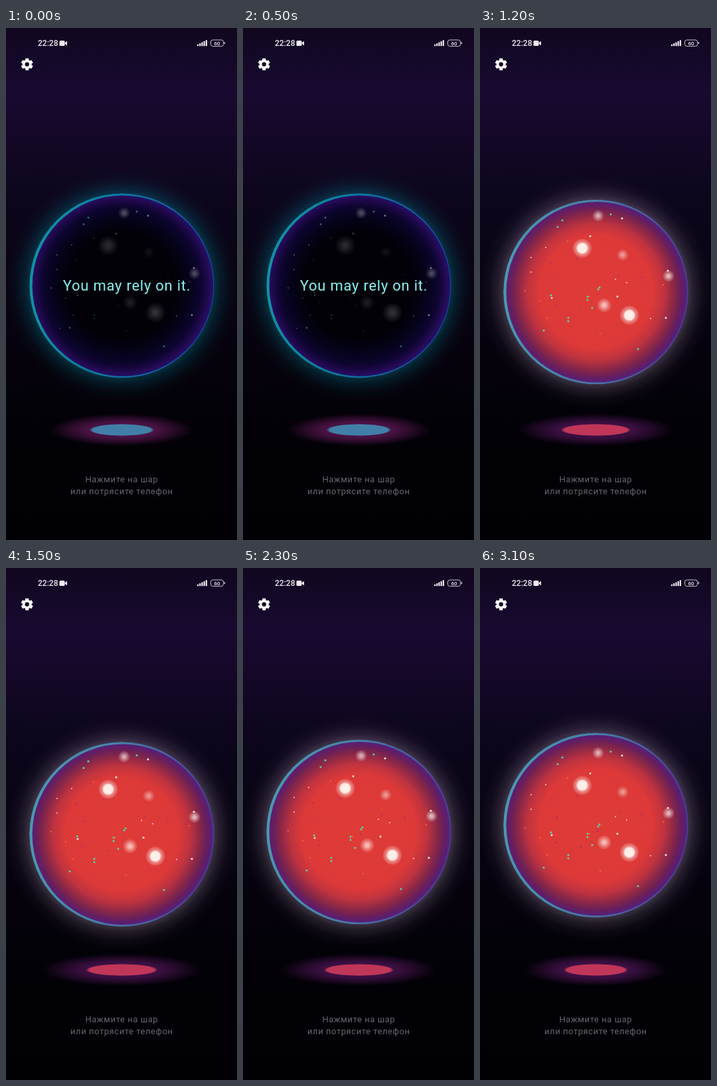
An HTML page with a canvas that plays this animation: 348x772 px, repeating every 3200 ms.

```html
<!DOCTYPE html>
<html lang="ru">
<head>
<meta charset="utf-8">
<style>
html, body { margin: 0; width: 100%; height: 100%; overflow: hidden; background: #030108; }
canvas { display: block; width: 348px; height: 772px; }
</style>
</head>
<body>
<canvas id="stage"></canvas>
<script>
const W = 348, H = 772, LOOP = 3200, STEP = 100;
const CX = 174.5, R = 139, REST_Y = 388.5;
const canvas = document.getElementById('stage');
const dpr = window.devicePixelRatio || 1;
canvas.width = W * dpr;
canvas.height = H * dpr;
const ctx = canvas.getContext('2d');
ctx.scale(dpr, dpr);

const DARK = {
  glow: '0,125,145', glowAlpha: 0.42,
  body: [[0, '#020107'], [0.58, '#020108'], [0.74, '#05031a'], [0.86, '#0d0530'], [0.92, '#1c0846'], [0.965, '#270c5e'], [1, '#141762']],
  rim: [[0, '#1193a3'], [0.35, '#0c7f9c'], [0.7, '#165fa5'], [1, '#243a9c']],
  floor: '#417fa8', floorGlow: '98,24,88'
};
const RED = {
  glow: '150,130,155', glowAlpha: 0.42,
  body: [[0, '#df3b37'], [0.62, '#dc3938'], [0.74, '#bf333f'], [0.86, '#842649'], [0.92, '#6a1f5a'], [0.965, '#5b1d72'], [1, '#47307e']],
  rim: [[0, '#4c98ac'], [0.35, '#4885a6'], [0.7, '#4d62a4'], [1, '#57379b']],
  floor: '#c03658', floorGlow: '78,20,86'
};

// Soft lights: x, y, radius, brightness when red, brightness when dark
const LIGHTS = [
  [154, 328, 15, 1, 0.2], [225, 429, 15, 1, 0.24], [178, 279, 9, 0.65, 0.36],
  [215, 338, 9, 0.5, 0.08], [187, 414, 11, 0.7, 0.14], [284, 370, 9, 0.7, 0.36]
];
// Small dots by colour: x, y pairs
const DOTS = [
  ['#4fe0b0', 1.5, [124,286, 117,296, 197,277, 107,399, 162,401, 162,406, 169,418, 133,433, 133,438, 96,452, 238,480, 180,387, 178,390]],
  ['#fff0ee', 1.5, [214,283, 166,310, 283,362, 280,433, 207,401, 108,403]],
  ['#ffd9cf', 1, [257,434, 99,327, 77,342, 77,364, 204,375, 221,380]],
  ['#f2662c', 1.2, [132,317, 68,392, 90,407, 181,457, 276,383, 101,433, 165,401]],
  ['#a32f78', 1.2, [106,350, 116,376, 209,369, 244,372, 177,397, 115,414, 152,421, 81,453, 146,344]]
];

function addStops(gradient, stops) {
  for (const [at, color] of stops) gradient.addColorStop(at, color);
  return gradient;
}

function radial(x, y, r0, r1, stops) {
  return addStops(ctx.createRadialGradient(x, y, r0, x, y, r1), stops);
}

function disc(x, y, r, fill) {
  ctx.fillStyle = fill;
  ctx.beginPath();
  ctx.arc(x, y, r, 0, 7);
  ctx.fill();
}

function label(text, x, y, font, color, spacing = 0, align = 'left') {
  ctx.font = font + ' Roboto, sans-serif';
  ctx.letterSpacing = spacing + 'px';
  ctx.textAlign = align;
  ctx.fillStyle = color;
  ctx.fillText(text, x, y);
}

function drawBackground() {
  ctx.fillStyle = addStops(ctx.createLinearGradient(0, 0, 0, H), [
    [0, '#12071f'], [0.045, '#130826'], [0.12, '#180a30'], [0.2, '#150829'],
    [0.32, '#0d061d'], [0.5, '#080412'], [0.68, '#05020b'], [0.82, '#020106'], [1, '#010005']
  ]);
  ctx.fillRect(0, 0, W, H);
}

function drawStatusBar() {
  label('22:28', 48, 27, '500 12px', '#eeeaf2');
  ctx.fillStyle = '#eeeaf2';
  ctx.beginPath();
  ctx.roundRect(80.5, 19, 8, 8, 1.5);
  ctx.fill();
  ctx.beginPath();
  ctx.moveTo(88, 23);
  ctx.lineTo(92, 19.5);
  ctx.lineTo(92, 26.5);
  ctx.fill();
  for (let i = 0; i < 5; i++) {
    const h = 2.5 + i * 1.6;
    ctx.fillRect(288 + i * 3.2, 27.2 - h, 2.2, h);
  }
  ctx.strokeStyle = '#c9c4d0';
  ctx.lineWidth = 1;
  ctx.beginPath();
  ctx.roundRect(308.5, 18, 19, 9.5, 3);
  ctx.stroke();
  ctx.fillRect(328.8, 21.2, 1.2, 3);
  label('60', 318, 25.7, '500 8px', '#eeeaf2', 0, 'center');
}

function drawGear() {
  ctx.save();
  ctx.translate(31.7, 54.8);
  ctx.strokeStyle = '#fff';
  ctx.lineWidth = 3.8;
  ctx.beginPath();
  ctx.arc(0, 0, 5.1, 0, 7);
  ctx.stroke();
  ctx.lineWidth = 5;
  for (let i = 0; i < 6; i++) {
    ctx.beginPath();
    ctx.moveTo(0, -5.5);
    ctx.lineTo(0, -9);
    ctx.stroke();
    ctx.rotate(Math.PI / 3);
  }
  ctx.restore();
}

function drawFloor(look, drop) {
  const wide = 1 + drop * 0.0088;
  ctx.save();
  ctx.translate(CX, 606);
  ctx.scale(wide, 1);
  ctx.save();
  ctx.scale(1, 0.225);
  const c = look.floorGlow;
  disc(0, 0, 108, radial(0, 0, 0, 108, [
    [0, `rgba(${c},.85)`], [0.5, `rgba(${c},.72)`], [0.75, `rgba(${c},.38)`], [1, `rgba(${c},0)`]
  ]));
  ctx.restore();
  ctx.scale(1, 0.185);
  disc(0, 0, 49, radial(0, 0, 0, 49, [[0, look.floor], [0.9, look.floor], [1, look.floor + '00']]));
  ctx.restore();
}

function drawHalo(look, cy) {
  const c = look.glow, a = look.glowAlpha;
  disc(CX, cy, R + 36, radial(CX, cy, R - 3, R + 36, [
    [0, `rgba(${c},${a})`], [0.3, `rgba(${c},${a * 0.48})`], [0.65, `rgba(${c},${a * 0.13})`], [1, `rgba(${c},0)`]
  ]));
}

function drawBall(look, cy) {
  disc(CX, cy, R - 0.5, radial(CX, cy, 0, R, look.body));
  // Crescent rim: thick on the left, thin on the right
  ctx.fillStyle = addStops(ctx.createLinearGradient(CX - R, cy - 20, CX + R, cy + 20), look.rim);
  ctx.beginPath();
  ctx.arc(CX, cy, R, 0, 7);
  ctx.closePath();
  ctx.moveTo(CX + 1.4 + R - 2.7, cy);
  ctx.arc(CX + 1.4, cy + 0.2, R - 2.7, 0, 7);
  ctx.fill('evenodd');
}

function drawLights(red, shift, alpha) {
  for (const [x, y, r, bright, dim] of LIGHTS) {
    const c = red ? '255,238,232' : '190,190,190';
    const a = red ? bright : dim;
    const core = red && bright === 1 ? 0.45 : 0.2;
    ctx.globalAlpha = alpha;
    disc(x, y + shift, r, radial(x, y + shift, 0, r, [
      [0, `rgba(${c},${a})`], [core, `rgba(${c},${a})`],
      [0.62, `rgba(${c},${a * 0.45})`], [0.9, `rgba(${c},${a * 0.16})`], [1, `rgba(${c},0)`]
    ]));
  }
  for (const [color, r, points] of DOTS) {
    for (let i = 0; i < points.length; i += 2) {
      const x = points[i], y = points[i + 1];
      const far = Math.hypot(x - CX, y - REST_Y) / R;
      ctx.globalAlpha = alpha * (red ? 0.95 : 0.05 + 0.65 * far * far);
      disc(x, y + shift, red ? r : r * 0.95, color);
    }
  }
  ctx.globalAlpha = 1;
}

function draw(t) {
  const cy = 395 - 7.5 * Math.cos((t - 250) / 3000 * 2 * Math.PI);
  const drop = cy - REST_Y;
  const shift = drop * 0.43;
  const heat = Math.min(1, Math.max(0, (t - 900) / 300));

  drawBackground();
  drawStatusBar();
  drawGear();
  for (const [look, alpha] of [[DARK, 1 - heat], [RED, heat]]) {
    ctx.globalAlpha = alpha;
    drawHalo(look, cy);
    drawFloor(look, drop);
  }
  ctx.globalAlpha = 1;
  drawBall(DARK, cy);
  ctx.globalAlpha = heat;
  drawBall(RED, cy);
  drawLights(false, shift, 1 - heat);
  drawLights(true, shift, heat);

  ctx.globalAlpha = 1 - heat;
  label('You may rely on it.', 85.8, cy + 7.8, '22px', '#86f3f3', 0.75);
  ctx.globalAlpha = 1;
  label('Нажмите на шар', 174.3, 685, '13px', '#6b6670', 0.56, 'center');
  label('или потрясите телефон', 174.3, 703, '13px', '#6b6670', 0.56, 'center');
}

function tick() {
  const t = performance.now() % LOOP;
  draw(Math.floor(t / STEP) * STEP);
  requestAnimationFrame(tick);
}
tick();
</script>
</body>
</html>
```
